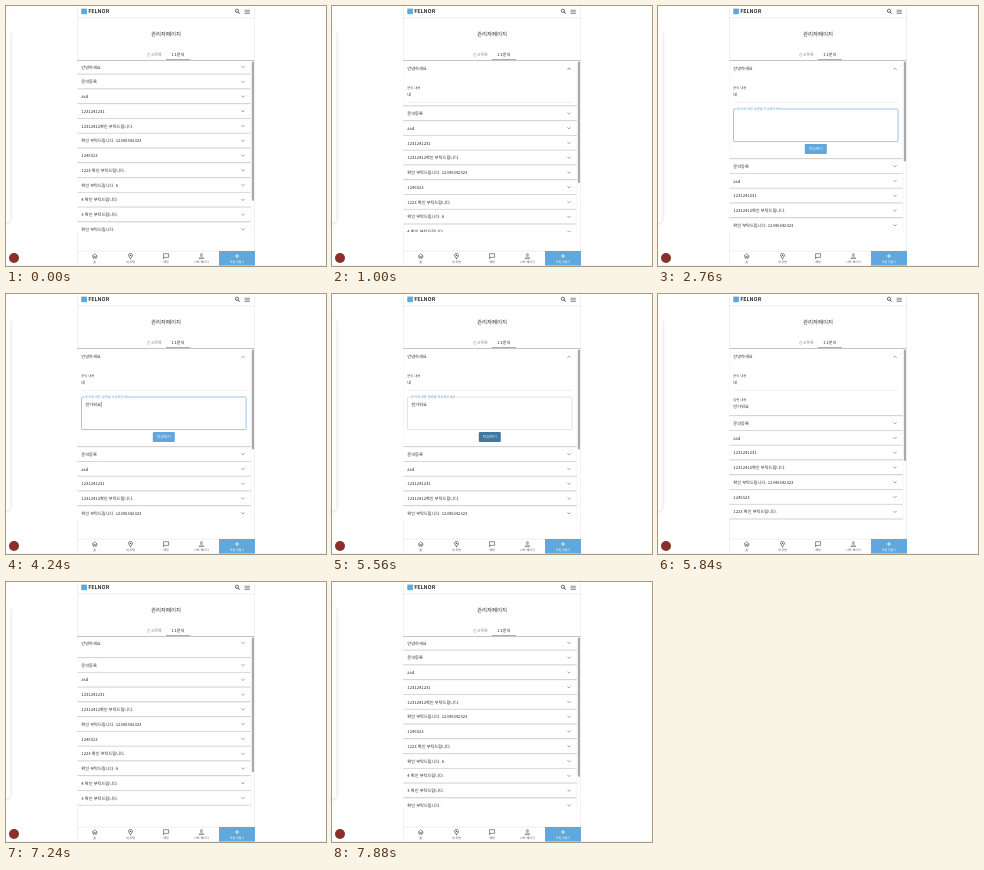
Animation of 320 by 260 pixels, one loop 7.96 s. Source, as an HTML page:

```html
<!DOCTYPE html>
<html lang="ko">
<head>
<meta charset="utf-8">
<title>관리자페이지</title>
<style>
html, body { margin: 0; width: 100%; height: 100%; overflow: hidden; background: #fff; }
svg { display: block; width: 320px; height: 260px; }
text { font-family: "Noto Sans CJK KR", "Noto Sans CJK", "Noto Sans", sans-serif; text-rendering: geometricPrecision; white-space: pre; }
.line { fill: none; stroke-linecap: round; stroke-linejoin: round; }
</style>
</head>
<body>
<svg id="stage" viewBox="0 0 320 260">
  <defs>
    <clipPath id="view"><rect x="71" y="54" width="178" height="172"/></clipPath>
    <filter id="soft" x="-50%" y="-10%" width="200%" height="120%"><feGaussianBlur stdDeviation="1.4"/></filter>
  </defs>
</svg>
<script>
const LOOP = 7960, STEP = 40;
const PITCH = 14.77, GROW = 3.6, TEXT = 4.22;
const FORM_H = 84.5, ANSWER_H = 53.5;
const BLUE = '#5fa7dc', INK = '#2e2e2e';
const OPEN = 900, FOCUS = 1450, TYPE = 3000, BLUR = 5480, SENT = 5760, CLOSE = 7080;
const ROWS = ['안녕하세요', '문의등록', 'asd', '1231241231', '12312412확인 부탁드립니다.',
  '확인 부탁드립니다. 12345542323', '1245523', '1223 확인 부탁드립니다.', '확인 부탁드립니다. 6',
  '4 확인 부탁드립니다.', '3 확인 부탁드립니다.', '확인 부탁드립니다.'];
const TYPED = ['ㅂ', '바', '반', '반ㄱ', '반가', '반강', '반가우', '반가워', '반가웡', '반가워요'];
const CARET = [[1440, 1840], [2340, 2760], [3000, 4260], [4600, 5040]];

const stage = document.getElementById('stage');

function add(parent, tag, attrs) {
  const el = document.createElementNS('http://www.w3.org/2000/svg', tag);
  set(el, attrs);
  parent.appendChild(el);
  return el;
}
function set(el, attrs) {
  for (const k in attrs) el.setAttribute(k, attrs[k]);
}
const rect = (p, x, y, width, height, fill, more) => add(p, 'rect', { x, y, width, height, fill, ...more });
const path = (p, d, stroke, width) => add(p, 'path', { d, stroke, 'stroke-width': width, class: 'line' });
const group = (p, more) => add(p, 'g', more || {});

// y is the visual middle of the text
function label(p, str, x, y, size, fill, more) {
  const el = add(p, 'text', { x, y: y + size * 0.37, 'font-size': size, fill, ...more });
  el.textContent = str;
  return el;
}
const MID = { 'text-anchor': 'middle' };
const TAB = { ...MID, 'font-weight': 500 };

function bezier(x1, y1, x2, y2) {
  const at = (a, b, s) => 3 * (1 - s) ** 2 * s * a + 3 * (1 - s) * s * s * b + s ** 3;
  return x => {
    if (x <= 0) return 0;
    if (x >= 1) return 1;
    let lo = 0, hi = 1;
    for (let i = 0; i < 30; i++) {
      const m = (lo + hi) / 2;
      if (at(x1, x2, m) < x) lo = m; else hi = m;
    }
    return at(y1, y2, lo);
  };
}
const inOut = bezier(0.4, 0, 0.2, 1);
const out = bezier(0, 0, 0.2, 1);

function mix(a, b, k) {
  return 'rgb(' + a.map((v, i) => Math.round(v + (b[i] - v) * k)) + ')';
}

function edge(p, y) {
  rect(p, 71.4, y - 0.6, 173.4, 0.6, '#b4b4b4');
  rect(p, 71.4, y, 173.4, 0.4, '#e6e6e6');
}

function chevron(p, y) {
  const g = group(p, { transform: `translate(237 ${y})` });
  return path(g, 'M-1.3 -.65 L0 .65 L1.3 -.65', '#707070', 0.65);
}

// left drawer edge and round badge
rect(stage, -20, 24, 25, 194, '#999', { rx: 6, filter: 'url(#soft)', opacity: 0.35 });
rect(stage, -20, 23, 24.5, 194, '#fff', { rx: 5 });
add(stage, 'circle', { cx: 8, cy: 252, r: 5, fill: '#8a2f2c' });

// page column
rect(stage, 71, 0, 0.5, 260, '#e2e2e2');
rect(stage, 248.3, 0, 0.5, 260, '#e2e2e2');
rect(stage, 71, 11.6, 177.5, 0.6, '#e0e0e0');
rect(stage, 75.3, 2.6, 5.6, 5.6, BLUE);
label(stage, 'FELNOR', 82.2, 5.4, 5.3, INK, { 'font-weight': 700 });
add(stage, 'circle', { cx: 230.9, cy: 4.8, r: 1.6, fill: 'none', stroke: '#333', 'stroke-width': 0.7 });
path(stage, 'M232.1 6 L233.7 7.6', '#333', 0.8);
path(stage, 'M239 4.2 h4.4 M239 5.8 h4.4 M239 7.4 h4.4', '#444', 0.6);

label(stage, '관리자페이지', 160, 28.2, 5.45, INK, MID);
label(stage, '신고목록', 148.3, 48.4, 4.1, '#8a8a8a', TAB);
label(stage, '1:1문의', 171.8, 48.4, 4.1, INK, TAB);

// accordion list
const list = group(stage, { 'clip-path': 'url(#view)' });
rect(list, 71.4, 54, 173.4, 180, '#fff');
const panel = group(list);
label(panel, '문의 내용', 75.3, 81.7, 3.3, '#444');
label(panel, '네', 75.3, 88.4, TEXT, INK);
rect(panel, 75.3, 96.5, 165, 0.5, '#e2e2e2');

const form = group(panel);
const box = rect(form, 75.5, 103, 164.6, 32.6, 'none', { rx: 1.2 });
const notch = rect(form, 78.6, 102, 44.6, 2, '#fff');
const hint = label(form, '문의에 대한 답변을 작성해주세요', 0, 0, 4.3, '#777');
const typed = label(form, '', 79.4, 110.6, TEXT, INK);
const caret = rect(form, 79.4, 107.6, 0.4, 5.8, '#222');
const button = rect(form, 146.8, 138, 22, 10, BLUE, { rx: 1.1 });
label(form, '작성하기', 157.8, 143, 3.8, '#fff', TAB);

const answer = group(panel);
label(answer, '답변 내용', 75.3, 105.4, 3.3, '#444');
label(answer, '반가워요', 75.3, 112.2, TEXT, INK);

const head = group(list);
label(head, ROWS[0], 75.3, 61, TEXT, INK);
const arrow = chevron(head, 61);

const rest = group(list);
rect(rest, 71.4, 68.4, 173.4, 180, '#fff');
edge(rest, 68.4);
ROWS.slice(1).forEach((str, i) => {
  const y = 61 + PITCH * (i + 1);
  label(rest, str, 75.3, y, TEXT, INK);
  chevron(rest, y);
  edge(rest, y + 7.4);
});
rect(list, 244.8, 54, 0.4, 174, '#e4e4e4');

rect(stage, 71, 54, 177.5, 0.7, '#a9a9a9');
rect(stage, 160, 53, 23.8, 1, '#7fbbe6');
const thumb = rect(stage, 245.9, 55.6, 2.1, 139, '#a8a8a8', { rx: 1 });

// bottom navigation
rect(stage, 71, 244.8, 177.5, 0.5, '#dcdcdc');
rect(stage, 213, 245, 36, 15, BLUE);
path(stage, 'M86.2 250.1 L88.7 247.8 L91.2 250.1 M87 249.8 V252.2 H88.1 V250.6 H89.3 V252.2 H90.4 V249.8', '#444', 0.6);
path(stage, 'M124.5 252.6 C121.6 249.6 122.3 247.5 124.5 247.5 C126.7 247.5 127.4 249.6 124.5 252.6 Z', '#444', 0.7);
add(stage, 'circle', { cx: 124.5, cy: 249.4, r: 0.6, fill: '#444' });
path(stage, 'M157.6 252.5 V247.7 H162.6 V251.4 H158.7 Z', '#444', 0.6);
add(stage, 'circle', { cx: 195.4, cy: 248.7, r: 1, fill: 'none', stroke: '#444', 'stroke-width': 0.6 });
path(stage, 'M193.2 252.2 C193.2 250.3 197.6 250.3 197.6 252.2 Z', '#444', 0.6);
path(stage, 'M229.3 250 h3.4 M231 248.3 v3.4', '#fff', 0.75);
[['홈', 88.7], ['내 주변', 124.5], ['채팅', 160], ['나의 페이지', 195.4], ['모임 만들기', 231]]
  .forEach(([str, x], i) => label(stage, str, x, 255.9, 3, i === 4 ? '#fff' : '#555', MID));
rect(stage, 0, 259.5, 320, 0.5, '#e4e4e4');

function render(t) {
  const sent = t >= SENT;
  const closing = t >= CLOSE;
  const turn = closing ? 1 - inOut((t - CLOSE) / 150) : inOut((t - OPEN) / 150);
  const spread = closing ? 1 - inOut((t - CLOSE) / 280) : inOut((t - OPEN) / 340);
  const grow = GROW * turn;
  const shift = grow + ((sent ? ANSWER_H : FORM_H) - GROW) * spread;

  set(head, { transform: `translate(0 ${grow / 2})` });
  set(arrow, { transform: `rotate(${-180 * turn})` });
  set(panel, { transform: `translate(0 ${grow - GROW})`, visibility: shift > 0 ? 'visible' : 'hidden' });
  set(rest, { transform: `translate(0 ${shift})` });
  set(thumb, { height: 173 * 173 / (215 + shift) });
  set(form, { display: sent ? 'none' : 'inline' });
  set(answer, { display: sent ? 'inline' : 'none' });

  const focused = t >= 1440 && t < BLUR;
  const hover = t >= 1400 && t < 1440;
  set(box, { stroke: focused ? '#6aa6dc' : hover ? '#555' : '#c4c4c4', 'stroke-width': focused ? 0.65 : 0.5 });

  const lift = out((t - FOCUS) / 200);
  const size = 1 - 0.25 * lift;
  const tint = lift * (1 - 0.8 * inOut((t - BLUR) / 200));
  set(hint, {
    transform: `translate(${79.6 - 0.5 * lift} ${111.2 - 8.6 * lift}) scale(${size})`,
    fill: mix([119, 119, 119], [91, 164, 218], tint)
  });
  set(notch, { visibility: lift > 0.6 ? 'visible' : 'hidden' });

  const keys = Math.min(TYPED.length, Math.floor((t - TYPE) / 95) + 1);
  const str = keys > 0 ? TYPED[keys - 1] : '';
  if (typed.textContent !== str) typed.textContent = str;
  set(caret, {
    x: 79.4 + str.length * TEXT * 0.92,
    visibility: CARET.some(([a, b]) => t >= a && t < b) ? 'visible' : 'hidden'
  });
  set(button, { fill: mix([95, 167, 220], [65, 120, 163], inOut((t - BLUR + 40) / 120)) });
}

const start = performance.now();
function tick() {
  const t = (performance.now() - start) % LOOP;
  render(Math.floor(t / STEP) * STEP);
  requestAnimationFrame(tick);
}
render(0);
requestAnimationFrame(tick);
</script>
</body>
</html>
```
